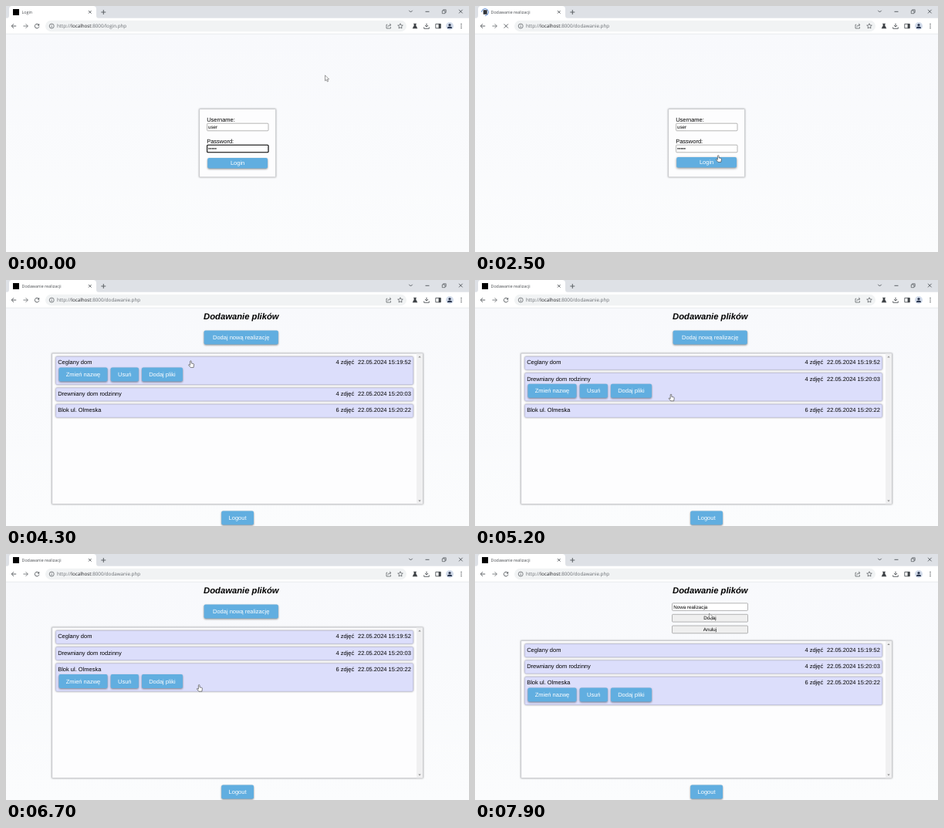
An HTML page for the animation above (8 s loop, 600 px wide and 319 px high).

```html
<!DOCTYPE html>
<html lang="pl">
<head>
<meta charset="utf-8">
<title>Dodawanie realizacji</title>
<style>
  html, body { margin: 0; width: 100%; height: 100%; overflow: hidden; background: #fff; }
  svg { display: block; width: 600px; height: 319px; }
  text { font-family: "Liberation Sans", Arial, sans-serif; font-size: 7.5px; white-space: pre; text-rendering: geometricPrecision; }
  .ui { font-family: "Open Sans", "Noto Sans", sans-serif; }
  .small { font-size: 6.25px; }
  .white { fill: #fff; }
  .icon { fill: none; stroke: #505458; stroke-width: .9; }
  .btn rect { filter: drop-shadow(0 1px 1px rgba(0,0,0,.45)); }
  .btn.up rect { filter: drop-shadow(0 1.8px 1.6px rgba(0,0,0,.45)); }
  .panel { filter: drop-shadow(0 .8px .8px rgba(0,0,0,.4)); }
</style>
</head>
<body>
<svg id="stage" viewBox="0 0 600 319" xmlns="http://www.w3.org/2000/svg"></svg>
<script>
const LOOP = 8000;
const BLUE = '#61aee0';
const ROWS = [
  ['Ceglany dom', '4 zdjęć', '22.05.2024 15:19:52'],
  ['Drewniany dom rodzinny', '4 zdjęć', '22.05.2024 15:20:03'],
  ['Blok ul. Olmeska', '6 zdjęć', '22.05.2024 15:20:22']
];
const TOP = 99.4, PITCH = 21.3, GROW = 19.3, ROW_H = 16.8, FORM_SHIFT = 17.4;

// Moments of the recorded session, in ms
const AT = { submit: 2000, title: 2300, page: 2600, loaded: 2800, open: [4100, 5000, 6000], form: 7500 };

// Pointer moves: start, end, x, y
const MOVES = [
  [0, 0, 413.5, 89.8],
  [550, 1500, 315.2, 193.7],
  [2700, 3100, 324.5, 189],
  [3300, 4000, 239.4, 104.8],
  [4500, 4900, 254, 148.2],
  [5400, 5850, 250.2, 169.6],
  [6750, 7250, 303.5, 77]
];

const rect = (x, y, w, h, fill, extra = '') =>
  `<rect x="${x}" y="${y}" width="${w}" height="${h}" fill="${fill}" ${extra}/>`;
const text = (x, y, str, extra = '') => `<text x="${x}" y="${y}" ${extra}>${str}</text>`;
const icon = (d, extra = '') => `<path class="icon" d="${d}" ${extra}/>`;
const group = (id, body, extra = '') => `<g id="${id}" ${extra}>${body}</g>`;

const button = (x, y, w, h, label, id = '') =>
  `<g class="btn" ${id && `id="${id}"`}>` + rect(x, y, w, h, BLUE, 'rx="1.9"') +
  text(x + w / 2, y + h / 2 + 2.6, label, 'class="white" text-anchor="middle"') + '</g>';

const field = (x, y, w, h, fill = '#fff') =>
  rect(x, y, w, h, fill, 'rx="1" stroke="#858585" stroke-width=".6"');

const greyButton = (y, label) => field(255.5, y, 98, 9.8, '#efefef') +
  text(304.5, y + 7.1, label, 'class="small" text-anchor="middle"');

function browser() {
  const url = (id, page) => `<text id="${id}" class="ui" x="66" y="28.3" style="font-size:6.25px" fill="#686c71">` +
    `http://<tspan fill="#202124">localhost</tspan>:8000/${page}.php</text>`;
  const title = (id, str) => text(20.5, 10, str, `id="${id}" class="ui" style="font-size:5.35px" fill="#45494d"`);
  return rect(0, 0, 600, 16, '#dee1e6') +
    '<path d="M1 16Q4 16 4 12V4Q4 0 8 0H113Q117 0 117 4V12Q117 16 120 16Z" fill="#fff"/>' +
    rect(0, 15.7, 600, 20.3, '#fff') + rect(0, 35.8, 600, .6, '#dcdee1') +
    rect(51, 18.8, 468, 14.4, '#f1f3f4', 'rx="7.2"') +
    group('favicon', rect(9, 4, 8, 8, '#000')) +
    group('spinner', rect(10.7, 5.2, 5, 5.6, '#30343a') +
      '<path id="arc" d="M13 3.6A4.4 4.4 0 1 0 17.4 8" fill="none" stroke="#4a7fd0" stroke-width=".9"/>') +
    title('titleA', 'Login') + title('titleB', 'Dodawanie realizacji') +
    url('urlA', 'login') + url('urlB', 'dodawanie') +
    icon('M107 6L110.6 9.6M110.6 6L107 9.6M126.3 5V11M123.3 8H129.3') +
    icon('M522.3 5.8L524.5 8L526.7 5.8M543.5 7.3H548.5M587 4.8L591.6 9.4M591.6 4.8L587 9.4') +
    icon('M565.3 6H569V9.7H565.3ZM566.6 6V4.8H570.2V8.4H569', 'style="stroke-width:.7"') +
    icon('M13.2 26H7.4M10 23.2L7.2 26L10 28.8') +
    icon('M22.4 26H28.2M25.6 23.2L28.4 26L25.6 28.8', 'opacity=".8"') +
    group('reload', icon('M42.3 24.3A2.8 2.8 0 1 0 42.9 26.6') +
      '<path d="M43.2 22.8V25.5H40.5Z" fill="#505458"/>') +
    group('stop', icon('M37.7 23.4L42.9 28.6M42.9 23.4L37.7 28.6')) +
    icon('M62.2 26A3 3 0 1 1 56.2 26A3 3 0 1 1 62.2 26M59.2 25.6V27.8M59.2 24.2V24.9', 'style="stroke-width:.7"') +
    icon('M494.3 24.2H493V29H498.5V27.2M494.8 27.2Q495 24.6 498.8 24.5M497.2 22.8L499 24.5L497.2 26.2', 'style="stroke-width:.7"') +
    icon('M511 22.7L511.9 24.9L514.3 25.1L512.5 26.7L513 29L511 27.8L509 29L509.5 26.7L507.7 25.1L510.1 24.9Z', 'style="stroke-width:.7"') +
    '<path d="M528 22.8H532V23.5H531.3V25.3L533.3 29.2H526.7L528.7 25.3V23.5H528Z" fill="#404448"/>' +
    icon('M545 22.6V27M542.9 25L545 27.1L547.1 25M541.7 27.4V29.3H548.3V27.4') +
    icon('M556.8 23.3H563.2V28.8H556.8Z') + rect(560.6, 23, 2.8, 6, '#404448') +
    '<circle cx="575" cy="26" r="5" fill="#d2dbea"/><circle cx="575" cy="24.5" r="1.6" fill="#2c3850"/>' +
    '<path d="M572 28.9Q572 26.6 575 26.6T578 28.9Z" fill="#2c3850"/>' +
    [23.6, 26, 28.4].map(y => `<circle cx="590" cy="${y}" r=".75" fill="#505458"/>`).join('');
}

function loginPage() {
  return rect(250.8, 133.8, 98.6, 88, '#fdfdfe', 'class="panel" stroke="#c6c8cc" stroke-width=".6"') +
    text(260.2, 150, 'Username:') + field(260.6, 152.2, 79.4, 9.6) +
    text(262, 159.1, 'user', 'class="small"') +
    text(260.2, 178, 'Password:') + field(260.6, 180.2, 79.4, 9.6) +
    group('focus', rect(260.6, 180.2, 79.4, 9.6, 'none', 'rx="1" stroke="#101010" stroke-width="1.1"')) +
    text(262, 187.2, '•••••', 'class="small"') +
    rect(273.2, 181.7, .6, 6.6, '#000', 'id="caret"') +
    button(261.2, 197, 77.8, 13.5, 'Login', 'login');
}

function listPage() {
  const rows = ROWS.map(([name, count, date], i) => group('row' + i,
    rect(64.7, 0, 462.8, ROW_H, '#dcdefb', 'class="panel box" rx="1.4" stroke="#bcbee0" stroke-width=".6"') +
    text(67.2, 10, name) + text(427.4, 10, count) + text(456, 10, date) +
    group('tools' + i, button(68.5, 14, 63, 18, 'Zmień nazwę') +
      button(135.7, 14, 36.2, 18, 'Usuń') + button(176, 14, 53, 18, 'Dodaj pliki')))).join('');
  return text(304.8, 51, 'Dodawanie plików',
      'text-anchor="middle" style="font:italic bold 11.25px \'Liberation Sans\',Arial,sans-serif"') +
    button(256.6, 65.4, 96.2, 18, 'Dodaj nową realizację', 'add') +
    group('form', field(255.5, 63.8, 98, 9.6) + text(257.2, 70.8, 'Nowa realizacja', 'class="small"') +
      greyButton(78.3, 'Dodaj') + greyButton(93, 'Anuluj')) +
    rect(59.8, 95.2, 480.4, 195.4, '#fdfdfe', 'id="list" class="panel" stroke="#c2c4c8" stroke-width=".6"') +
    rect(532, 95.5, 8, 194.8, '#f0f0f1', 'id="bar"') +
    '<path id="barTop" d="M534.3 100.6L536 98.6L537.7 100.6Z" fill="#8d8d8d"/>' +
    '<path d="M534.3 285.4L536 287.4L537.7 285.4Z" fill="#8d8d8d"/>' +
    rows + button(279.2, 299.5, 41.8, 18, 'Logout');
}

const pointer = () =>
  group('arrow', '<path d="M0 0V7.2L1.7 5.7L2.9 8.3L4.1 7.8L2.9 5.2H5.1Z" fill="#fff" stroke="#4a4a4a" stroke-width=".55"/>') +
  group('hand', '<path d="M-.8 .7Q-.8 0 0 0T.8 .7V3.2L3.6 3.8Q4.3 4 4.2 4.8L3.7 8.6H-.3L-2.8 5.6Q-2.9 4.6 -1.8 5L-.8 5.7Z" ' +
    'fill="#fff" stroke="#333" stroke-width=".6" stroke-linejoin="round"/>');

const stage = document.getElementById('stage');
stage.innerHTML =
  '<defs><linearGradient id="bg" x2="0" y2="1"><stop stop-color="#f8f9fc"/><stop offset="1" stop-color="#fbfcfd"/></linearGradient></defs>' +
  rect(0, 36, 600, 283, 'url(#bg)') +
  group('loginPage', loginPage()) + group('listPage', listPage()) + browser() + group('pointer', pointer());

const el = {};
stage.querySelectorAll('[id]').forEach(node => el[node.id] = node);
const show = (id, on) => { el[id].style.display = on ? '' : 'none'; };
const shift = (id, x, y) => el[id].setAttribute('transform', `translate(${x} ${y})`);
const ease = p => p < .5 ? 4 * p ** 3 : 1 - 4 * (1 - p) ** 3;
const inside = ([px, py], x, y, w, h) => px >= x && px <= x + w && py >= y && py <= y + h;

function pointerAt(t) {
  let [, , x, y] = MOVES[0];
  for (const [from, to, tx, ty] of MOVES.slice(1)) {
    if (t < from) break;
    const k = ease(Math.min(1, (t - from) / (to - from)));
    x += (tx - x) * k;
    y += (ty - y) * k;
  }
  return [x, y];
}

function raise(id, on) {
  el[id].classList.toggle('up', on);
  shift(id, 0, on ? -.9 : 0);
}

function draw(t) {
  const pos = pointerAt(t);
  const onList = t >= AT.page, form = t >= AT.form;
  const loading = t >= AT.submit && t < AT.loaded;
  const titled = t >= AT.title;
  const open = AT.open.filter(at => t >= at).length - 1;
  const down = form ? FORM_SHIFT : 0;

  show('loginPage', !onList);
  show('listPage', onList);
  show('titleA', !titled); show('urlA', !titled);
  show('titleB', titled); show('urlB', titled);
  show('favicon', !loading); show('spinner', loading);
  show('reload', !loading); show('stop', loading);
  el.arc.setAttribute('transform', `rotate(${t * .36} 13 8)`);

  const focused = t < AT.submit;
  show('focus', focused);
  show('caret', focused && t % 1000 >= 500);
  show('form', form);
  show('add', !form);

  el.list.setAttribute('y', 95.2 + down);
  el.list.setAttribute('height', 195.4 - down);
  el.bar.setAttribute('y', 95.5 + down);
  el.bar.setAttribute('height', 194.8 - down);
  shift('barTop', 0, down);

  let hand = false;
  ROWS.forEach((_, i) => {
    const y = TOP + down + i * PITCH + (open >= 0 && i > open ? GROW : 0);
    const h = ROW_H + (i === open ? GROW : 0);
    shift('row' + i, 0, y);
    el['row' + i].querySelector('.box').setAttribute('height', h);
    show('tools' + i, i === open);
    hand ||= onList && inside(pos, 64.7, y, 462.8, h);
  });

  const onLogin = !onList && inside(pos, 261, 193, 78, 17.5);
  const onAdd = onList && !form && inside(pos, 256.6, 65.4, 96.2, 18);
  raise('login', onLogin);
  raise('add', onAdd);
  hand ||= onLogin || onAdd;
  show('hand', hand);
  show('arrow', !hand);
  shift('pointer', ...pos);
}

const start = performance.now();
function tick() {
  draw((performance.now() - start) % LOOP);
  requestAnimationFrame(tick);
}
tick();
</script>
</body>
</html>
```
